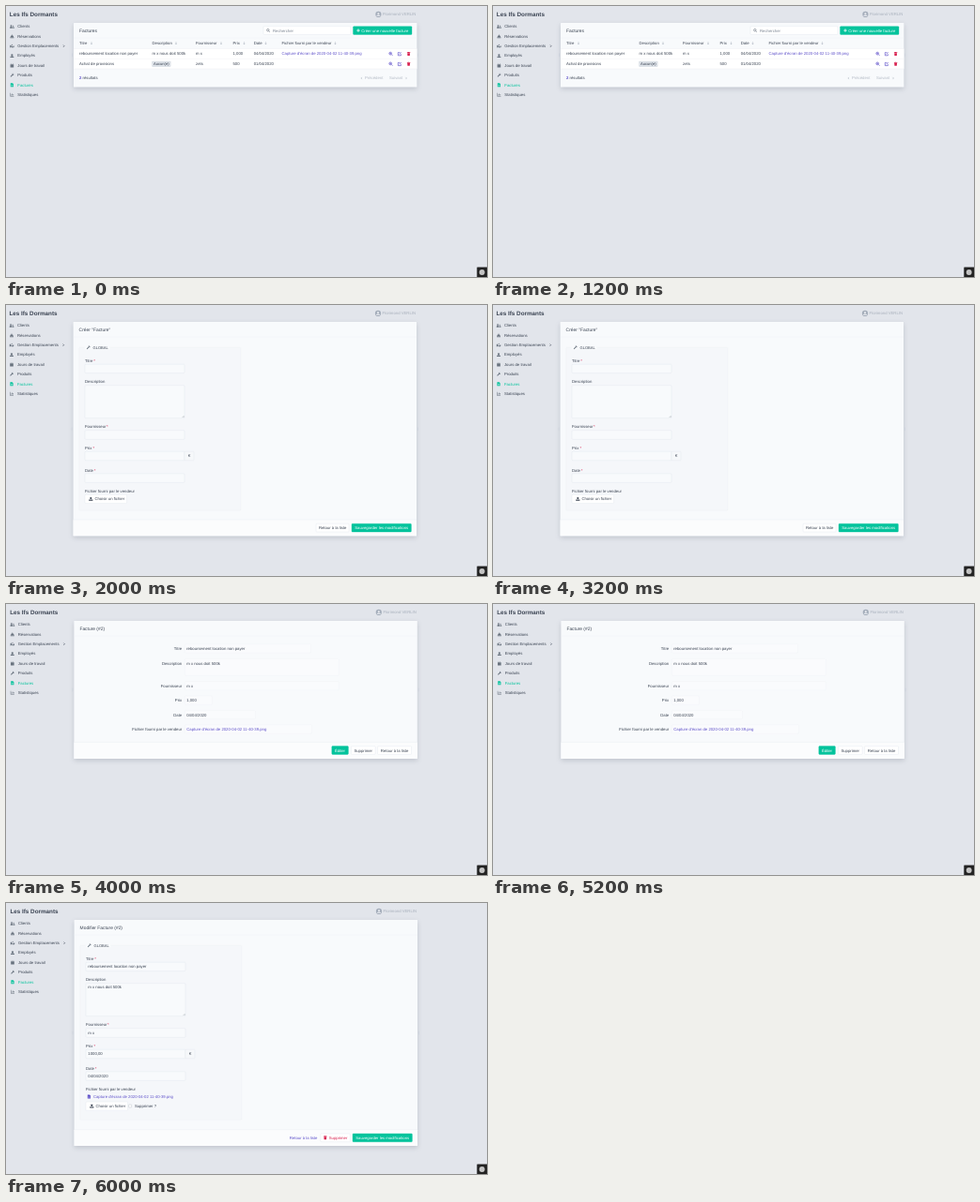
An HTML page that plays this animation: 512x289 px, repeating every 8 s.

```html
<!DOCTYPE html>
<html lang="fr">
<head>
<meta charset="utf-8">
<title>Factures</title>
<style>
html, body { margin: 0; width: 100%; height: 100%; overflow: hidden; background: #e2e5eb; }
svg { display: block; width: 512px; height: 289px; }
text { font-family: "Liberation Sans", Arial, sans-serif; text-rendering: geometricPrecision; white-space: pre; }
.panel { filter: drop-shadow(0 2px 2.5px rgba(60, 70, 90, .2)); }
</style>
</head>
<body>
<svg id="stage" viewBox="0 0 512 289"></svg>
<script>
const INK = '#3a4352', GREY = '#69737f', PALE = '#b4bbc6', LINE = '#dde2e9';
const TEAL = '#04c39c', LINK = '#5d4fc9', RED = '#d8204f', SOFT = '#f8fafc';
const STEP = 2000;
const FILE = "Capture d'écran de 2020-04-02 11-40-39.png";
const TITLE = 'reboursement location non payer', NOTE = 'm x nous doit 500k';

const text = (x, y, s, fill = INK, size = 4.25, extra = '') =>
  `<text x="${x}" y="${y}" fill="${fill}" font-size="${size}" ${extra}>${s}</text>`;
const rect = (x, y, w, h, fill, stroke = 'none', r = .8) =>
  `<rect x="${x}" y="${y}" width="${w}" height="${h}" rx="${r}" fill="${fill}" stroke="${stroke}" stroke-width=".35"/>`;
const line = (x1, x2, y, stroke = LINE) =>
  `<path d="M${x1} ${y}H${x2}" stroke="${stroke}" stroke-width=".35"/>`;

// Icons live in a 4 x 4 box centred on 0,0; the flag means outlined.
const icons = {
  users: ['M-.9-1.7a.8.8 0 1 1-.1 0zM1.2-1.3a.6.6 0 1 1-.1 0zM-2.3 1.7V1q0-.9 1.4-.9T.5 1v.7zM.9 1.7V.2q1.5-.2 1.5.7v.8z'],
  desk: ['M-2 1h4v.8h-4zM-1.7.7a1.7 1.9 0 0 1 3.4 0zM-.3-1.8h.6v.7h-.6z'],
  map: ['M-2.2-.7-.9-1.2V1.2l-1.3.6zM-.6-.2.6.3V1.8L-.6 1.3zM.9.3 2.2-.4V1.2L.9 1.8zM.2-.4Q-1-2 .2-2T.2-.4'],
  worker: ['M-1.1-.8a1.1 1.1 0 1 1 2.2 0a1.1 1.1 0 1 1-2.2 0M-2 2V1.4Q-2 .5 0 .5T2 1.4V2z'],
  calendar: ['M-1.8-1.5h.6V-2h.6v.5H.6V-2h.6v.5h.6v.8h-3.6zM-1.8-.4h3.6V2h-3.6z'],
  wrench: ['M-1.8 1.2.2-.8Q-.2-2 1.3-2L.9-1.2l.4.4.8-.4Q2 .4.7.1L-1.2 2z'],
  bill: ['M-1.6-2H.6l1 1V2h-3.2zM-1-.2v.3h2v-.3zM-1 .7V1h2V.7z', 0, 'evenodd'],
  stats: ['M-2-1.8h.5V1.4H2V1.9H-2zM-1.1 0h.6v1h-.6zM0-1.1h.6V1H0zM1.1-.6h.6V1h-.6z'],
  search: ['M-1.4-.4a1.2 1.2 0 1 1 2.4 0a1.2 1.2 0 1 1-2.4 0M.7.5 1.8 1.7', 1],
  zoom: ['M-1.8-.4a1.4 1.4 0 1 1 2.8 0a1.4 1.4 0 1 1-2.8 0M.7.6 2 1.9M-1-.4H.2M-.4-1V.2', 1],
  edit: ['M.4-1.4H-1.7V1.8H1.4V.3M-.5.6 1.7-1.6', 1],
  trash: ['M-1.7-1.7H-.6l.2-.4h.8l.2.4h1.1v.6h-3.4zM-1.4-.8h2.8L1.2 2h-2.4z'],
  upload: ['M-.6.6V-.4h-1L0-2 1.6-.4h-1v1zM-2.1.7h1.2v.4H.9V.7h1.2V2h-4.2z'],
  sort: ['M-1-.3 0-1.5 1-.3zM-1 .3 0 1.5 1 .3z'],
  left: ['M.5-1.1-.5 0 .5 1.1', 1],
  right: ['M-.5-1.1.5 0-.5 1.1', 1],
};
function icon(name, x, y, color) {
  const [d, outlined, rule = 'nonzero'] = icons[name];
  const paint = outlined ? `fill="none" stroke="${color}" stroke-width=".65"` : `fill="${color}" fill-rule="${rule}"`;
  return `<path transform="translate(${x} ${y})" d="${d}" ${paint}/>`;
}

const button = (x, y, w, label, pad, fill = '#fff', color = INK) =>
  rect(x, y, w, 8.8, fill, fill === TEAL ? TEAL : LINE) + text(x + pad, y + 5.9, label, color);

function panel(bottom, title) {
  const mid = (18 + bottom) / 2;
  return `<g class="panel">${rect(72, 18, 365.4, bottom - 18, SOFT, 'none', .5)}</g>` +
    rect(70.2, mid - 2, .7, 4, '#ccd2dc') + rect(438.3, mid - 2, .7, 4, '#ccd2dc') +
    line(72, 437.4, 34, '#edf0f4') + text(78, 27.8, title, INK, 4.9);
}
const footer = (top, bottom) =>
  rect(72, top, 365.4, bottom - top, '#fbfcfd', 'none', .5) + line(72, 437.4, top, '#e5e9ee');

function listPage() {
  const cols = [78, 155.5, 202, 241.5, 263.7, 293.5];
  const heads = [['Titre', 91], ['Description', 181], ['Fournisseur', 229], ['Prix', 253.5],
    ['Date', 276.5], ['Fichier fourni par le vendeur', 350.5]];
  const rows = [[TITLE, NOTE, 'm x', '1,000', '04/04/2020', FILE],
    ['Achat de provisions', '', 'zets', '500', '01/04/2020', '']];
  let out = panel(86.5, 'Factures') + rect(72, 45.5, 365.4, 21.5, '#fff', 'none', 0) +
    rect(274, 21.7, 93, 8.8, '#fff', LINE) + icon('search', 279, 26.1, GREY) +
    text(284, 27.6, 'Rechercher', '#7c8592') +
    button(369.5, 21.7, 62.5, 'Créer une nouvelle facture', 8.7, TEAL, '#fff') +
    `<path d="M373.3 26.1h3.4m-1.7-1.7v3.4" stroke="#fff" stroke-width=".8"/>`;
  heads.forEach(([s, x], i) => out += text(cols[i], 41.3, s) + icon('sort', x, 39.8, PALE));
  for (const y of [45.5, 56.3, 67]) out += line(72, 437.4, y, '#e8ebf0');
  rows.forEach((row, r) => {
    const y = 51 + r * 10.8;
    row.forEach((s, i) => out += text(cols[i], y + 1.4, s, i === 5 ? LINK : INK));
    out += icon('zoom', 409.6, y, LINK) + icon('edit', 419, y, LINK) + icon('trash', 428.6, y, RED);
  });
  return out + rect(155.2, 58.7, 20.3, 6.2, '#dde2e8') + text(157, 63.2, 'Aucun(e)', INK, 4.1) +
    text(78, 78.4, '2', LINK, 4.25, 'font-weight="bold"') + text(81.6, 78.4, 'résultats') +
    icon('left', 378.4, 77, PALE) + text(382, 78.4, 'Précédent', PALE) +
    text(408, 78.4, 'Suivant', PALE) + icon('right', 426, 77, PALE);
}

function formPage(editing) {
  const fields = [['Titre', 60.6, 63.2, 9.4, TITLE], ['Description', 83.3, 85.7, 35, NOTE],
    ['Fournisseur', 131.2, 133.7, 9.6, 'm x'], ['Prix', 153.9, 156.2, 9.6, '1000,00'],
    ['Date', 177.6, 179.8, 9.6, '04/04/2020']];
  const widths = [8.5, 0, 22.3, 7.7, 9];
  const bottom = editing ? 259 : 246.3, base = bottom - 17.3;
  const fileY = editing ? 212 : 202.2;
  let out = panel(bottom, editing ? 'Modifier Facture (#2)' : 'Créer "Facture"') + footer(base, bottom) +
    rect(78.2, 45.2, 172, editing ? 186 : 174, '#f5f7fa', '#e8ecf1') +
    rect(84, 43, 27, 4.5, SOFT, 'none', 0) + icon('wrench', 88, 45.2, GREY) + text(92.9, 46.8, 'GLOBAL', INK, 4.05);
  fields.forEach(([label, y, top, h, value], i) => {
    out += text(84.4, y, label) + rect(84.4, top, 106, h, SOFT, LINE);
    if (widths[i]) out += text(84.4 + widths[i] + .8, y, '*', RED);
    if (editing) out += text(86.7, top + (i === 1 ? 5.6 : 6.2), value);
  });
  out += `<path d="M188 120 190 118M189.2 120 190 119.2" stroke="${GREY}" stroke-width=".3"/>` +
    rect(190.4, 156.2, 10, 9.6, '#f6f8fa', LINE) + text(194.3, 162.4, '€') +
    text(84.4, 200, 'Fichier fourni par le vendeur') +
    rect(84.4, fileY, 44.6, 9.2, '#fff', LINE) + icon('upload', 90.7, fileY + 4.5, INK) +
    text(94.8, fileY + 6, 'Choisir un fichier');
  if (editing) out += icon('bill', 87.8, 206.5, LINK) + text(92.3, 208.1, FILE, LINK) +
    rect(130, 215, 3, 3, '#fff', '#aab2bd', .4) + text(136.3, 218, 'Supprimer ?') +
    text(301.2, base + 10.1, 'Retour à la liste', LINK) +
    button(334.2, base + 4.2, 31.5, 'Supprimer', 9, '#fff', RED) + icon('trash', 339.2, base + 8.6, RED);
  else out += button(330.5, base + 4.2, 35, 'Retour à la liste', 2.8);
  return out + button(368.4, base + 4.2, 63.4, 'Sauvegarder les modifications', 3.2, TEAL, '#fff');
}

function showPage() {
  const fields = [['Titre', 48.9, 134, TITLE], ['Description', 64.5, 164, NOTE], ['Fournisseur', 88.7, 164, 'm x'],
    ['Prix', 104.1, 29, '1,000'], ['Date', 119.5, 75, '04/04/2020'], ['Fichier fourni par le vendeur', 134.9, 135, FILE]];
  let out = panel(165, 'Facture (#2)') + footer(147.4, 165);
  fields.forEach(([label, y, w, value], i) => {
    out += rect(190, y - 6.2, w, i === 1 ? 18 : 9.4, '#fafbfd', '#edf0f4') +
      text(186.8, y, label, INK, 4.25, 'text-anchor="end"') + text(191.8, y, value, i === 5 ? LINK : INK);
  });
  return out + button(346.4, 151.6, 17.6, 'Éditer', 3.1, TEAL, '#fff') +
    button(367, 151.6, 25.8, 'Supprimer', 3, '#fff') + button(395.2, 151.6, 36, 'Retour à la liste', 3.2);
}

function frameParts() {
  const menu = [['Clients', 'users'], ['Réservations', 'desk'], ['Gestion Emplacements', 'map'], ['Employés', 'worker'],
    ['Jours de travail', 'calendar'], ['Produits', 'wrench'], ['Factures', 'bill'], ['Statistiques', 'stats']];
  let out = text(3.8, 11, 'Les Ifs Dormants', INK, 6.3, 'font-weight="bold"') +
    `<circle cx="396.4" cy="8.9" r="3.1" fill="#a4adba"/>` + icon('worker', 396.4, 9, '#e2e5eb') +
    text(401, 10.3, 'Florimond VERLIN', '#a8b0bc');
  menu.forEach(([label, name], i) => {
    const y = 22 + i * 10.36, color = i === 6 ? TEAL : INK;
    out += icon(name, 6.4, y, i === 6 ? TEAL : GREY) + text(12.3, y + 1.4, label, color);
  });
  return out + icon('right', 61.5, 42.7, INK);
}

const pages = [listPage(), formPage(false), showPage(), formPage(true)];
const shifts = [0, -.4, .4, .6];
const stage = document.getElementById('stage');
stage.innerHTML = pages.map((page, i) =>
  `<g class="page" transform="translate(${shifts[i]} 0)">${frameParts()}${page}</g>`).join('') +
  rect(501.3, 278.6, 11, 11, '#222', 'none', .3) + '<circle cx="506.7" cy="284" r="3" fill="#c4c4c4"/>';
const views = stage.querySelectorAll('.page');

function draw() {
  const now = Math.floor(performance.now() / STEP) % views.length;
  views.forEach((v, i) => v.setAttribute('display', i === now ? 'inline' : 'none'));
  requestAnimationFrame(draw);
}
draw();
</script>
</body>
</html>
```
